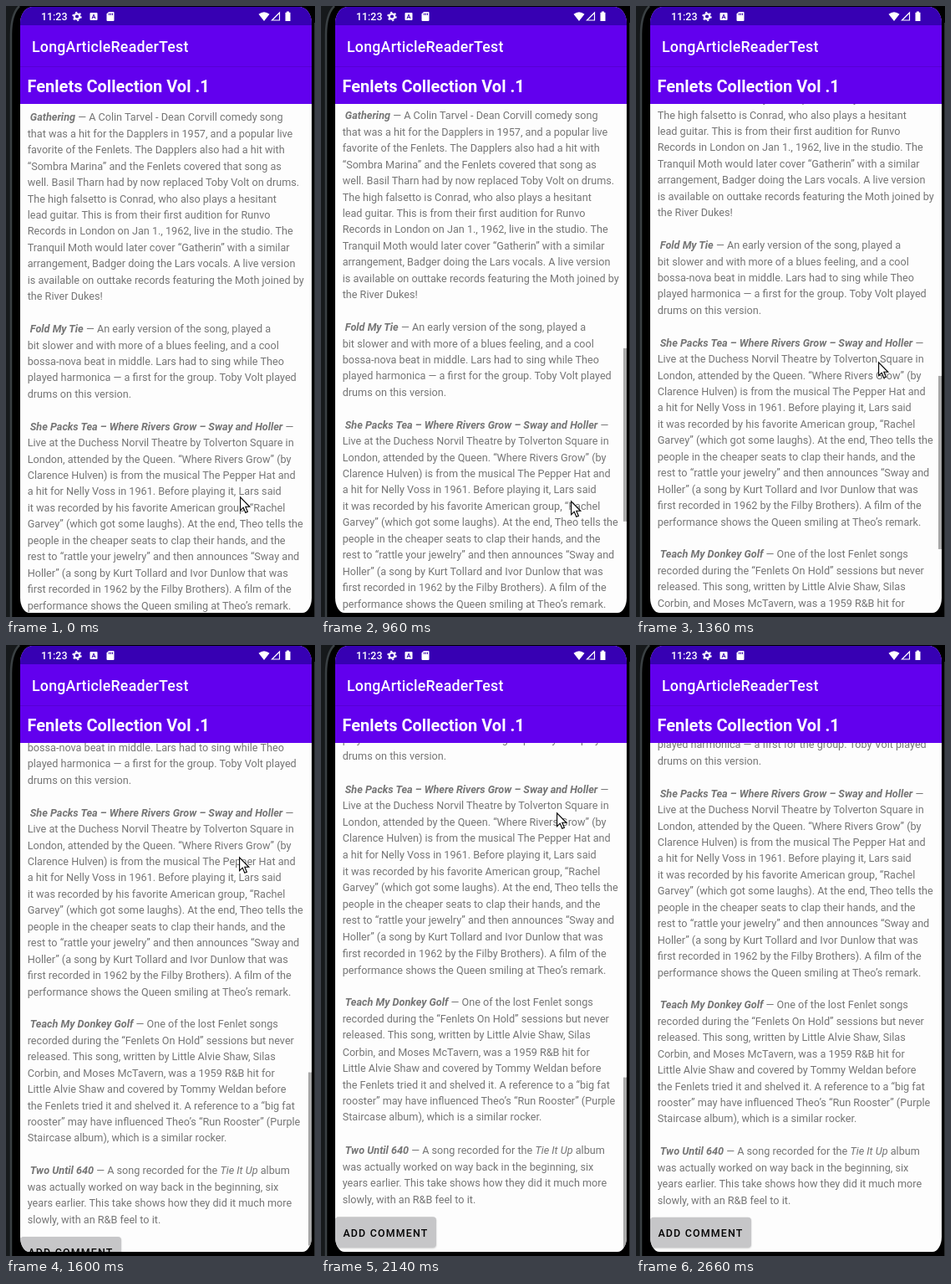
These frames come from a looping animation (370x730 px, 4090 ms). An HTML page:

```html
<!DOCTYPE html>
<html lang="en">
<head>
<meta charset="utf-8">
<title>Scrolling article</title>
<style>
html, body { margin: 0; width: 100%; height: 100%; overflow: hidden; background: #0b0c0d; }
#stage { position: relative; width: 370px; height: 730px; overflow: hidden; background: #000; font-family: Roboto, sans-serif; }
#screen { position: absolute; left: 17px; top: 1px; width: 349px; height: 724px; overflow: hidden;
  background: #fdfdfd; border-radius: 15px 15px 11px 11px / 20px 20px 18px 18px; }
#view { position: absolute; left: 0; top: 116px; width: 349px; height: 608px; overflow: hidden; }
#stretch { position: absolute; inset: 0; transform-origin: 50% 100%; }
#content { position: absolute; left: 0; top: 0; width: 349px; }
#text { position: absolute; left: 8.7px; top: 6.4px; white-space: pre; color: #757575;
  font-size: 12.65px; line-height: 19.43px; }
#button { position: absolute; left: 0; top: 892.3px; width: 121px; height: 36px; border-radius: 4px;
  background: #c6c6c8; color: #000; text-align: center; font: 500 12.4px/37px Roboto, sans-serif;
  letter-spacing: 1.2px; box-shadow: 0 1px 2px rgba(0, 0, 0, .22); }
#bar { position: absolute; right: 0; top: 290.5px; width: 4px; height: 207px; background: #a9a9a9; }
svg { position: absolute; left: 0; top: 0; overflow: visible; }
</style>
</head>
<body>
<div id="stage">
  <svg width="370" height="730" fill="none">
    <path d="M0 0H16Q6 10 6 34V730H0Z" fill="#16191b"/>
    <path d="M16 0Q6 10 6 34V730" stroke="#3a4043" stroke-width="2.5"/>
    <path d="M369.5 20V730" stroke="#2a2e30"/>
  </svg>
  <div id="screen">
    <div id="view"><div id="stretch">
      <div id="content">
        <div id="text"></div>
        <div id="button">ADD COMMENT</div>
      </div>
      <div id="bar"></div>
    </div></div>
    <svg width="349" height="116" viewBox="17 1 349 116" fill="#fff">
      <rect x="17" width="349" height="117" fill="#6200ee"/>
      <rect x="17" width="349" height="23" fill="#3700b3"/>
      <rect x="17" y="72" width="349" height="1" fill="#5600d2"/>
      <text x="42" y="17" font-size="12.4" font-weight="500">11:23</text>
      <g fill="none" stroke="#fff">
        <circle cx="85" cy="12.5" r="3.2" stroke-width="2.2"/>
        <circle cx="85" cy="12.5" r="4.9" stroke-width="1.6" stroke-dasharray="2.2 2.93"/>
      </g>
      <rect x="100.5" y="8" width="9" height="9" rx="1"/>
      <text x="105" y="15.3" font-size="7.5" font-weight="700" text-anchor="middle" fill="#3700b3">A</text>
      <path d="M123 7h5.5a1 1 0 0 1 1 1v9a1 1 0 0 1-1 1h-7a1 1 0 0 1-1-1V9.5Z"/>
      <path d="M123.5 8.5v2.5M125.5 8.5v2.5M127.5 8.5v2.5" stroke="#3700b3"/>
      <path d="M302.5 9.8Q309 4.8 315.5 9.8L309 18Z"/>
      <path d="M327.5 8V17H318.5Z" fill="none" stroke="#fff" stroke-width="1.2"/>
      <path d="M336 6.5h3v1.2h1.5v10.3h-6V7.7H336Z"/>
      <text x="31" y="54.6" font-size="17.8" font-weight="500" letter-spacing=".22">LongArticleReaderTest</text>
      <text x="25.5" y="102.5" font-size="20" font-weight="700">Fenlets Collection Vol .1</text>
    </svg>
  </div>
  <svg id="cursor" width="14" height="22" viewBox="0 0 14 22">
    <path d="M.6 .9V16.6L4.2 13.2 6.8 19.3 9.4 18.2 6.8 12.3H11.8Z" fill="#fff" stroke="#000" stroke-width="1.1"/>
  </svg>
</div>
<script>
const article = [
  ["Gathering", `A Colin Tarvel - Dean Corvill comedy song
that was a hit for the Dapplers in 1957, and a popular live
favorite of the Fenlets. The Dapplers also had a hit with
“Sombra Marina” and the Fenlets covered that song as
well. Basil Tharn had by now replaced Toby Volt on drums.
The high falsetto is Conrad, who also plays a hesitant
lead guitar. This is from their first audition for Runvo
Records in London on Jan 1., 1962, live in the studio. The
Tranquil Moth would later cover “Gatherin” with a similar
arrangement, Badger doing the Lars vocals. A live version
is available on outtake records featuring the Moth joined by
the River Dukes!`],
  ["Fold My Tie", `An early version of the song, played a
bit slower and with more of a blues feeling, and a cool
bossa-nova beat in middle. Lars had to sing while Theo
played harmonica — a first for the group. Toby Volt played
drums on this version.`],
  ["She Packs Tea – Where Rivers Grow – Sway and Holler", `
Live at the Duchess Norvil Theatre by Tolverton Square in
London, attended by the Queen. “Where Rivers Grow” (by
Clarence Hulven) is from the musical The Pepper Hat and
a hit for Nelly Voss in 1961. Before playing it, Lars said
it was recorded by his favorite American group, “Rachel
Garvey” (which got some laughs). At the end, Theo tells the
people in the cheaper seats to clap their hands, and the
rest to “rattle your jewelry” and then announces “Sway and
Holler” (a song by Kurt Tollard and Ivor Dunlow that was
first recorded in 1962 by the Filby Brothers). A film of the
performance shows the Queen smiling at Theo’s remark.`],
  ["Teach My Donkey Golf", `One of the lost Fenlet songs
recorded during the “Fenlets On Hold” sessions but never
released. This song, written by Little Alvie Shaw, Silas
Corbin, and Moses McTavern, was a 1959 R&amp;B hit for
Little Alvie Shaw and covered by Tommy Weldan before
the Fenlets tried it and shelved it. A reference to a “big fat
rooster” may have influenced Theo’s “Run Rooster” (Purple
Staircase album), which is a similar rocker.`],
  ["Two Until 640", `A song recorded for the <i>Tie It Up</i> album
was actually worked on way back in the beginning, six
years earlier. This take shows how they did it much more
slowly, with an R&amp;B feel to it.`]
];

const LOOP = 4090, END = 325.3;
// time, cursor x, cursor y, scroll, overscroll stretch in %, scrollbar opacity
const steps = [
  [0, 280, 586, 0, 0, 0],
  [150, 284, 590, 0, 0, 0],
  [280, 291, 597, 0, 0, 0],
  [390, 297, 604, 0, 0, 0],
  [530, 304, 623, 0, 0, 0],
  [820, 304, 620, 0, 0, 0],
  [960, 299, 591, 2.5, 0, 1],
  [1100, 298, 556, 11, 0, 1],
  [1230, 295, 504, 33.5, 0, 1],
  [1360, 290, 425, 100, 0, 1],
  [1480, 284, 335, 200, 0, 1],
  [1600, 279, 253, 302, 0, 1],
  [1720, 278, 195, END, .8, 1],
  [1870, 279, 168, END, 1.45, 1],
  [2020, 279, 170, END, 1.45, 1],
  [2140, 282, 200, END, .9, 1],
  [2260, 287, 256, END, .36, 1],
  [2380, 276, 530, END, 0, 1],
  [2530, 267, 630, END, 0, .5],
  [2660, -40, 630, END, 0, 0]
];

const el = id => document.getElementById(id);
const [text, content, stretch, bar, cursor] = ["text", "content", "stretch", "bar", "cursor"].map(el);
text.innerHTML = article.map(([head, body]) => ` <b><i>${head}</i></b> — ${body}`).join("\n\n");

const start = performance.now();
function draw() {
  const t = Math.max(0, performance.now() - start) % LOOP;
  const [, x, y, scroll, pull, alpha] = steps.findLast(s => s[0] <= t);
  content.style.transform = `translateY(${-scroll}px)`;
  stretch.style.transform = pull ? `scaleY(${1 + pull / 100})` : "none";
  bar.style.transform = `translateY(${scroll * .3395}px)`;
  bar.style.opacity = alpha;
  cursor.style.transform = `translate(${x}px, ${y}px)`;
  requestAnimationFrame(draw);
}
draw();
</script>
</body>
</html>
```
